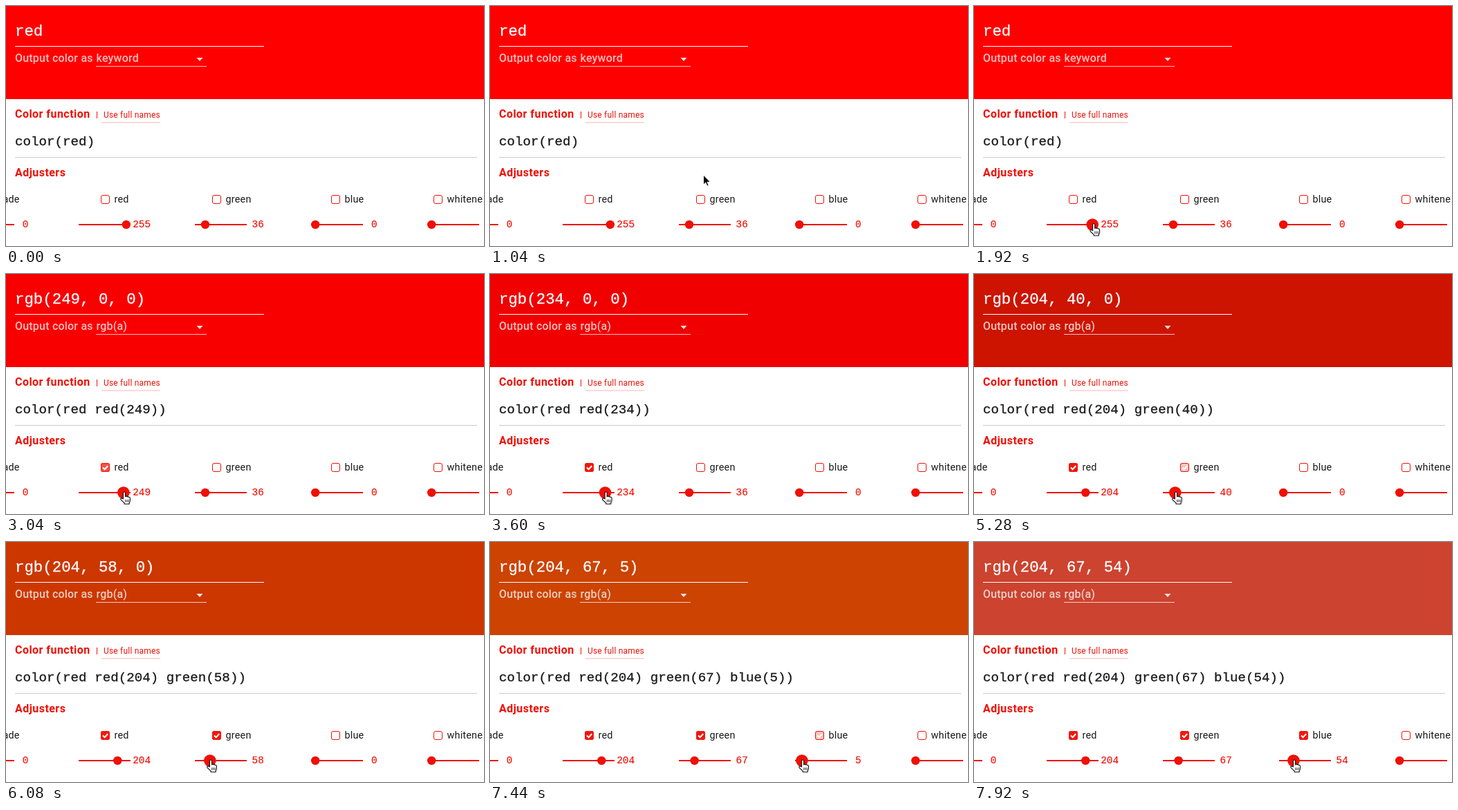
Recreate the animation shown at these times as an HTML page. Size 691 px wide and 348 px high, loop 8 s.

```html
<!DOCTYPE html>
<html lang="en">
<head>
<meta charset="utf-8">
<title>Color adjusters</title>
<style>
html, body { margin: 0; width: 100%; height: 100%; overflow: hidden; background: #fff; }
svg { display: block; width: 100vw; height: 100vh; }
text { font: 14.4px Roboto, sans-serif; letter-spacing: .2px; fill: #1a1a1a; }
.accent { fill: #ef1006; }
.title { font-weight: 700; font-size: 16px; letter-spacing: .45px; }
.link { font-size: 12px; }
.output { font-size: 16px; font-weight: 500; fill: #fff; fill-opacity: .75; }
.result, .code, .value { font-family: "Liberation Mono", monospace; letter-spacing: 0; stroke-width: .3px; }
.result { font-size: 22.4px; fill: #fff; stroke: #fff; }
.code { font-size: 19.2px; stroke: #1a1a1a; }
.value { text-anchor: middle; stroke: #ef1006; stroke-width: .15px; }
</style>
</head>
<body>
<svg viewBox="0 0 691 348"></svg>
<script>
const LOOP = 8000, STEP = 80, RED = '#ef1006';
const TRACK = 75, SMALL = 6.2, LARGE = 8.8, TIP_Y = 315.5;
const svg = document.querySelector('svg');

// Each slider is held from grab to release; keys are [time, value].
const channels = [
  { name: 'red', x: 105, box: 137, grab: 2720, start: 2800, release: 4400, initial: 255,
    keys: [[2720, 255], [2800, 249], [3280, 249], [4160, 209], [4240, 204]] },
  { name: 'green', x: 273, box: 298, grab: 5040, start: 5200, release: 6320, initial: 0,
    keys: [[5120, 36], [6080, 58], [6320, 67]] },
  { name: 'blue', x: 441, box: 470, grab: 7040, start: 7360, release: LOOP, initial: 0,
    keys: [[7280, 0], [7440, 5], [7840, 54]] }
];

// The cursor's way to the first slider: [time, x, y]
const approach = [[480, 331, 291], [800, 308, 244], [1360, 308, 244], [1520, 214, 312],
  [1680, 144, 331], [1920, 172, 315], [2080, 179, 313], [2720, 172, TIP_Y]];

const mix = (a, b, p) => a + (b - a) * p;

function at(keys, t, i = 1) {
  const n = keys.findIndex(k => k[0] >= t);
  if (n < 0) return keys[keys.length - 1][i];
  if (n === 0) return keys[0][i];
  const a = keys[n - 1], b = keys[n];
  return mix(a[i], b[i], (t - a[0]) / (b[0] - a[0]));
}

const value = (c, t) => Math.round(at(c.keys, t));
const applied = (c, t) => t < c.start ? c.initial : value(c, t);
const thumbX = (x, v, r) => x + r + (TRACK - 2 * r) * v / 255;
const heldX = (c, t) => thumbX(c.x, value(c, t), LARGE);

// The header colour trails the sliders.
const trailing = (c, t) => Math.round([0, 1, 2, 3].reduce((sum, n) => sum + applied(c, t - n * STEP), 0) / 4);

function pointer(t) {
  const n = channels.findIndex(c => t <= c.release), c = channels[n];
  if (t >= c.grab) return [heldX(c, t), TIP_Y];
  if (n === 0) return [at(approach, t), at(approach, t, 2)];
  const from = channels[n - 1];
  const p = (t - from.release) / (c.grab - from.release);
  return [mix(heldX(from, t), heldX(c, t), p * p * (3 - 2 * p)), TIP_Y + 8 * Math.sin(Math.PI * p)];
}

const text = (x, y, cls, s) => `<text x="${x}" y="${y}" class="${cls}">${s}</text>`;
const rect = (x, y, w, h, fill, more = '') =>
  `<rect x="${x}" y="${y}" width="${w}" height="${h}" fill="${fill}" ${more}/>`;

function checkbox(x, label, on) {
  return rect(x + .5, 274.5, 12, 12, '#fff', `rx="2.5" stroke="${RED}"`) +
    (on ? `<g opacity="${on}">${rect(x, 274, 13, 13, '#f3170c', 'rx="3"')}
      <path d="M${x + 3} 280.5l2.6 2.7 4.6-5" fill="none" stroke="#fff" stroke-width="2"/></g>` : '') +
    text(x + 19.5, 285, '', label);
}

const slider = (x, v, r) => rect(x, 316, TRACK, 2, RED) +
  `<circle cx="${thumbX(x, v, r)}" cy="317" r="${r}" fill="${RED}"/>`;

function cursor(x, y, hand) {
  if (!hand) return `<path transform="translate(${x} ${y})" d="M.5 1v14l3.3-3 2.2 5.2 2.2-1L6 11.3h4.5z" stroke="#fff"/>`;
  return `<g transform="translate(${x - 4.8} ${y - .5}) scale(1.1)" stroke="#111">
    <path d="M4 10V2.3a1.4 1.4 0 0 1 2.8 0V7q1.3-1 2.3.2 1.3-.7 2 .6 1.8-.4 2 1.4V12q0 2-1.2 3.4v1.4H5.5V15.5L.8 11q-.7-1.5.8-2z" fill="#fff"/>
    <path d="M7 11v3.5m2-3.5v3.5m2-3.5v3.5" stroke-width=".8"/></g>`;
}

function draw(t) {
  const [x, y] = pointer(t);
  const visible = t >= 480 && t < 1520 || t >= 1680;
  const over = c => visible && y > 305 && y < 322 && x > c.x - 2 && x < c.x + TRACK + 2;
  const active = channels.filter(c => t >= c.start);
  const result = active.length ? `rgb(${channels.map(c => applied(c, t)).join(', ')})` : 'red';
  const code = ['red', ...active.map(c => `${c.name}(${value(c, t)})`)].join(' ');

  svg.innerHTML =
    rect(0, 0, 691, 135, `rgb(${channels.map(c => trailing(c, t))})`) +
    text(13, 43, 'result', result) + rect(13, 58, 360, 1, '#fff') +
    text(13, 81, 'output', 'Output color as') +
    text(130.5, 81, 'output', active.length ? 'rgb(a)' : 'keyword') +
    rect(130, 87, 160, 1, '#fff', 'opacity=".75"') +
    '<path d="M275.5 75h9l-4.5 5z" fill="#fff" opacity=".85"/>' +
    text(13, 162, 'accent title', 'Color function') +
    rect(131, 153, 1, 10, RED) +
    text(141, 162, 'accent link', 'Use full names') + rect(138, 168.5, 85, 1, '#fbb5b1') +
    text(13, 202, 'code', `color(${code})`) + rect(13, 219, 668, 1, '#c8c8c8') +
    text(13, 247, 'accent title', 'Adjusters') +
    text(-4.5, 285, '', 'ade') + rect(0, 316, 12, 2, RED) + text(28, 321, 'accent value', 0) +
    channels.map(c =>
      checkbox(c.box, c.name, Math.max(0, Math.min(1, (t - c.start) / 320))) +
      slider(c.x, value(c, t), over(c) ? LARGE : SMALL) +
      text(c.x + 91.2, 321, 'accent value', value(c, t))).join('') +
    checkbox(618, 'whitene', 0) + slider(609, 0, SMALL) +
    (visible ? cursor(x, y, channels.some(over)) : '');
}

let last = -1;
function tick() {
  const t = Math.floor(performance.now() % LOOP / STEP) * STEP;
  if (t !== last) draw(last = t);
  requestAnimationFrame(tick);
}
tick();
</script>
</body>
</html>
```
